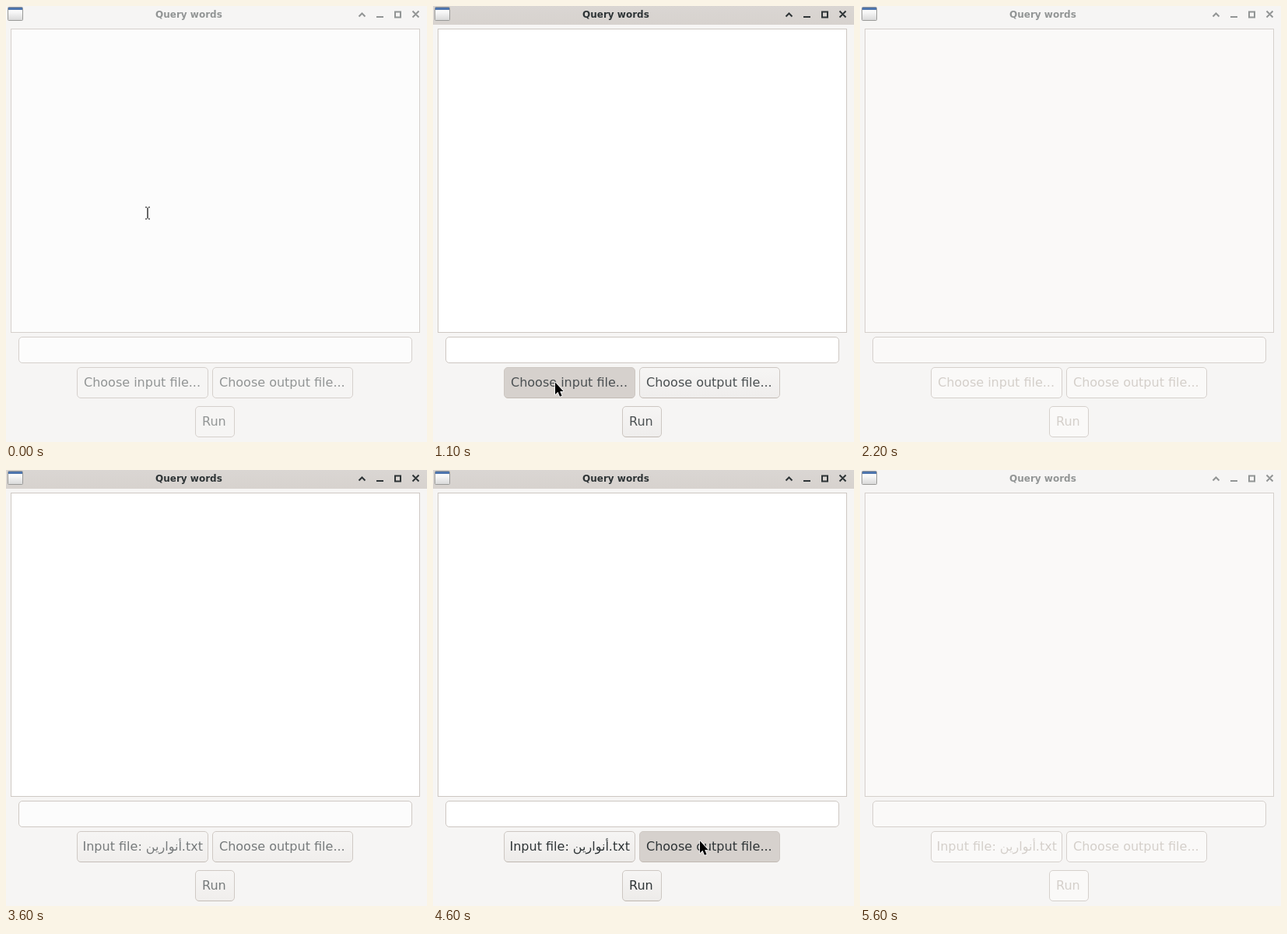
An HTML page for the animation above (8000 ms loop, 541 by 559 pixels).

```html
<!DOCTYPE html>
<html lang="en">
<head>
<meta charset="utf-8">
<title>Query words</title>
<style>
html, body { margin: 0; width: 100%; height: 100%; overflow: hidden; background: #f6f5f4; }
svg { display: block; width: 541px; height: 559px; font: 16px "DejaVu Sans", sans-serif; }
text { white-space: pre; }
.title { font-weight: bold; font-size: 12px; fill: var(--ink); }
.sign { fill: none; stroke: var(--ink); stroke-width: 2; }
.box { stroke: var(--line); }
.btn { fill: url(#face); stroke: url(#edge); }
.label { fill: var(--text); }
</style>
</head>
<body>
<svg id="win" viewBox="0 0 541 559">
  <defs>
    <linearGradient id="face" x2="0" y2="1">
      <stop style="stop-color:var(--top)"/><stop offset="1" style="stop-color:var(--bottom)"/>
    </linearGradient>
    <linearGradient id="edge" x2="0" y2="1">
      <stop offset=".93" style="stop-color:var(--line)"/><stop offset="1" style="stop-color:var(--low)"/>
    </linearGradient>
    <linearGradient id="bar" x2="0" y2="1">
      <stop stop-color="#dad6d3"/><stop offset="1" stop-color="#d7d2ce"/>
    </linearGradient>
    <linearGradient id="pane" x2="0" y2="1">
      <stop stop-color="#fff"/><stop offset=".4" stop-color="#f6f6f6"/><stop offset="1" stop-color="#d8d8d8"/>
    </linearGradient>
  </defs>

  <rect width="541" height="559" fill="#f6f5f4"/>
  <rect id="titlebar" width="541" height="24" fill="url(#bar)"/>
  <rect x="2.5" y="1.5" width="19" height="17" rx="1" fill="url(#pane)" stroke="#9a9a98"/>
  <rect x="3" y="2" width="18" height="3" fill="#4d74ad"/>
  <text class="title" x="192" y="15">Query words</text>
  <path class="sign" d="M453.5 13.5l4-4 4 4M476 14h9M500 7.5h7v7h-7zM522.5 6.500l8 8m0-8l-8 8"/>

  <rect class="box" x="6.5" y="29.5" width="525" height="389" style="fill:var(--view)"/>
  <rect class="box" x="16.5" y="424.5" width="505" height="33" rx="4.5" style="fill:var(--entry)"/>

  <rect class="btn" id="input" x="91.5" y="463.5" width="168" height="39" rx="4.500"/>
  <rect class="btn" id="output" x="265.5" y="463.5" width="180" height="39" rx="4.5"/>
  <rect class="btn" x="243.5" y="513.5" width="50" height="39" rx="4.5"/>
  <text class="label" id="name" y="488"></text>
  <text class="label" x="274" y="488">Choose output file...</text>
  <text class="label" x="252" y="538">Run</text>

  <g id="arrow">
    <path d="M0 0V15.500L3.500 12.300L6 18.300L8.600 17.200L6.200 11.400H10.600Z"
      stroke="#fff" stroke-width="1.600" stroke-linejoin="round" paint-order="stroke"/>
  </g>
  <g id="beam" fill="none">
    <path d="M-3 -7.500H3M-3 7.500H3M0 -7V7" stroke="#fff" stroke-width="3"/>
    <path d="M-3 -7.500H-1M1 -7.500H3M-3 7.500H-1M1 7.500H3M0 -7V7" stroke="#000" stroke-width="1.200"/>
  </g>
</svg>

<script>
const LOOP = 8000, TICK = 100;
const $ = id => document.getElementById(id);
const keys = ["view", "entry", "line", "low", "top", "bottom", "text"];

const looks = {
  idle:   ["#fcfcfc", "#fcfcfc", "#d5d0cc", "#d5d0cc", "#f6f5f4", "#f6f5f4", "#929595"],
  waking: ["#fff", "#fff", "#cdc7c2", "#c2bbb4", "#f6f5f4", "#efedec", "#4b5052"],
  active: ["#fff", "#fff", "#cdc7c2", "#bfb8b1", "#f6f5f4", "#edebe9", "#2e3436"],
  fading: ["#faf9f8", "#faf9f8", "#d2cdc8", "#d0cac5", "#f8f7f6", "#f8f7f6", "#969999"],
  locked: ["#faf9f8", "#faf9f8", "#d5d0cc", "#d5d0cc", "#faf9f8", "#faf9f8", "#d4cfca"],
  rising: ["#fff", "#fcfcfc", "#cfc9c4", "#c5beb8", "#f6f5f4", "#f0eeec", "#767a7b"]
};

// time, look, title bar lit, pressed button, its fill
const steps = [
  [0, "idle", 0],
  [1000, "idle", 1, "input", "#e6e3e0"],
  [1100, "waking", 1, "input", "#d6d1cd"],
  [1200, "active", 1, "input", "#d6d1cd"],
  [1300, "fading", 0, "input", "#ebe8e5"],
  [1400, "locked", 0],
  [3600, "rising", 1],
  [3700, "active", 1],
  [4500, "active", 1, "output", "#e2dedb"],
  [4600, "active", 1, "output", "#d6d1cd"],
  [4800, "fading", 0, "output", "#ebe8e5"],
  [4900, "locked", 0]
];

// time, x, y; no place means the pointer is away
const path = [
  [0, 182, 265.5], [200, 182, 271], [300, 181, 291], [400, 179, 329],
  [500, 175, 377], [600, 169, 423], [700, 163, 457], [800, 159, 475], [900, 157, 482.5],
  [2100, 35, 482.5], [2200],
  [4000, 60, 488], [4100, 160, 486], [4200, 250, 484], [4300, 306, 482.5], [4400, 343, 475.5],
  [5200, 328, 476.5], [5300, 287, 479], [5400, 222, 482], [5500, 142, 485], [5600]
];

const last = (table, t) => table.filter(row => row[0] <= t).pop();
const show = (el, on) => { el.style.display = on ? "" : "none"; };

function draw(t) {
  const [, look, lit, pressed, fill] = last(steps, t);
  const css = $("win").style;
  keys.forEach((key, i) => css.setProperty("--" + key, looks[look][i]));
  css.setProperty("--ink", lit ? "#2e3436" : "#929595");
  show($("titlebar"), lit);
  for (const id of ["input", "output"]) $(id).style.fill = id === pressed ? fill : "";

  const chosen = t >= 3600;
  $("name").textContent = chosen ? "Input file: أنوارين.txt" : "Choose input file...";
  $("name").setAttribute("x", chosen ? 98.5 : 100);

  const [, x, y] = last(path, t);
  const here = x !== undefined, typing = y < 460;
  show($("arrow"), here && !typing);
  show($("beam"), here && typing);
  if (here) $(typing ? "beam" : "arrow").setAttribute("transform", `translate(${x} ${y})`);
}

const start = performance.now();
let shown = -1;
function frame() {
  const t = Math.floor((performance.now() - start) % LOOP / TICK) * TICK;
  if (t !== shown) draw(shown = t);
  requestAnimationFrame(frame);
}
frame();
</script>
</body>
</html>
```
